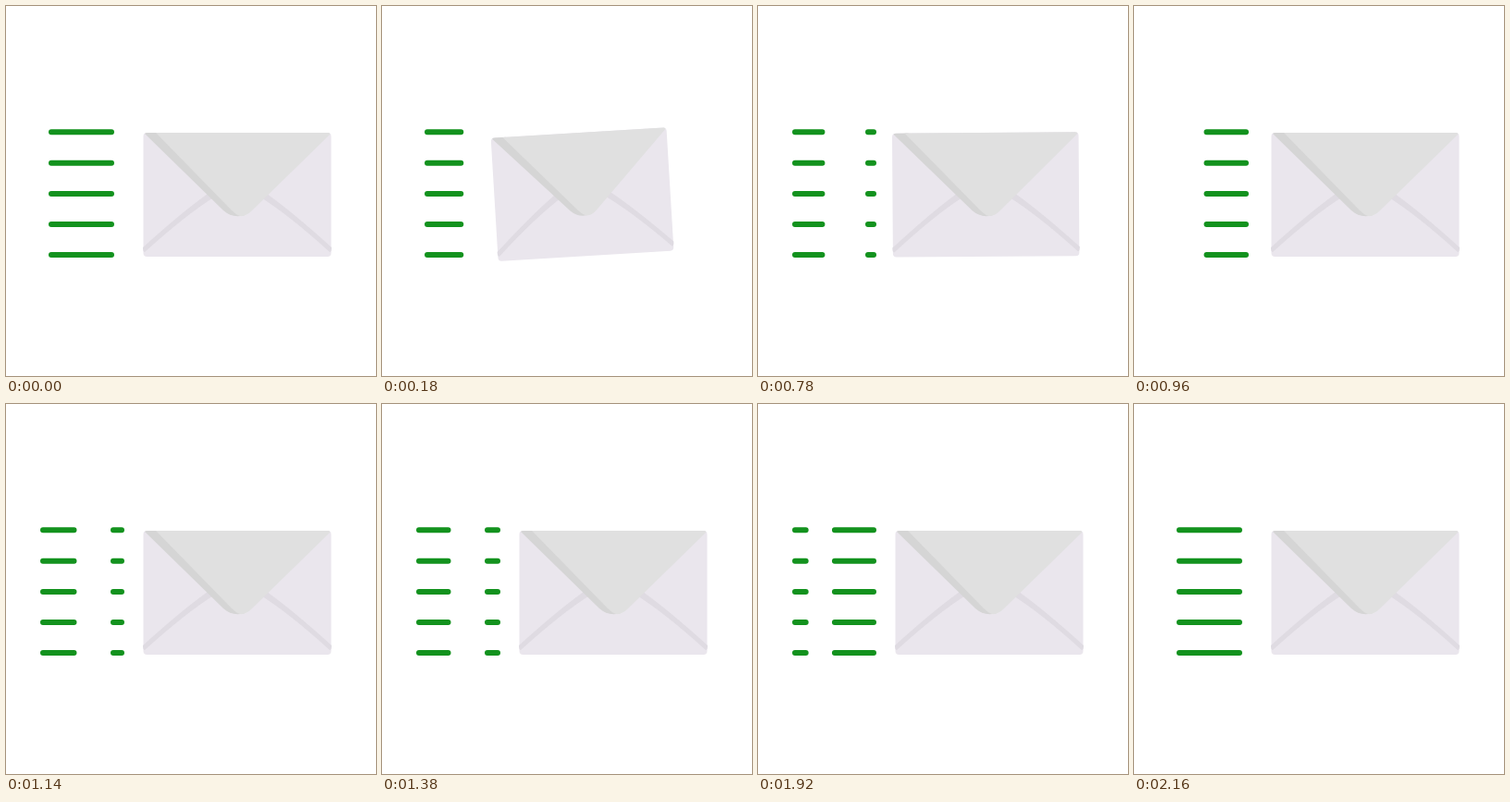
Write an HTML page that moves like this. It is 400x400 px and loops after 4190 ms.

```html
<!DOCTYPE html>
<html lang="en">
<head>
<meta charset="utf-8">
<title>Sending mail</title>
<style>
  html, body { margin: 0; width: 100%; height: 100%; overflow: hidden; background: #fff; }
  svg { display: block; width: 100%; height: 100%; }
</style>
</head>
<body>
<svg viewBox="0 0 400 400">
  <path id="lines" fill="none" stroke="#13921e" stroke-width="6" stroke-linecap="round"/>
  <g id="envelope">
    <rect x="-101.5" y="-67" width="203" height="134" rx="4" fill="#eae6ed"/>
    <g fill="#dfdbe2">
      <path id="crease" d="M-102 57Q-60 19-32-1L-24 2Q-56 22-100 62Q-102 62-102 57Z"/>
      <use href="#crease" transform="scale(-1 1)"/>
    </g>
    <path fill="#d5d5d5" d="M-100-66Q-99-67-97-67H-84L4 20L8 22Q-5 26-15 17Z"/>
    <path fill="#e0e0e0" d="M-88-67H98Q101-67 100-65L16 17Q9 24 3 23Q-1 22-7 16Z"/>
  </g>
</svg>
<script>
const LOOP = 4190, STEP = 30, LAST = 2160;
const TRACK = { from: 40, to: 125 };
const PERIOD = TRACK.to - TRACK.from;
const ROWS = [136.2, 169.8, 202.9, 236, 269];
// time, unwrapped left end of the dash
const TRAVEL = [[540, 159], [780, 119], [1140, 31], [1380, -56], [1680, -187], [2160, -291]];

const lines = document.getElementById('lines');
const envelope = document.getElementById('envelope');

const ease = (t, from, to) => {
  const x = Math.min(1, Math.max(0, (t - from) / (to - from)));
  return x * x * (3 - 2 * x);
};

function slope(i) {
  if (i === TRAVEL.length - 1) return 0;
  const [a, b] = [TRAVEL[Math.max(0, i - 1)], TRAVEL[i + 1]];
  return (b[1] - a[1]) / (b[0] - a[0]);
}

function travel(t) {
  let i = 0;
  while (i < TRAVEL.length - 2 && t >= TRAVEL[i + 1][0]) i++;
  const [[t0, p0], [t1, p1]] = [TRAVEL[i], TRAVEL[i + 1]];
  const d = t1 - t0, x = (t - t0) / d, y = 1 - x;
  return p0 * (1 + 2 * x) * y * y + p1 * x * x * (3 - 2 * x)
    + d * x * y * (slope(i) * y - slope(i + 1) * x);
}

function dash(t) {
  if (t < 540) return [49, 65 * (1 - ease(t, 0, 390))];
  return [travel(t), 42.5 * ease(t, 540, 864) + 22.5 * ease(t, 1680, LAST)];
}

// A dash leaving one end of the track comes back at the other.
function linePath(start, length) {
  if (length < 0.5) return '';
  const left = TRACK.from + ((start - TRACK.from) % PERIOD + PERIOD) % PERIOD;
  let d = '';
  for (const x of [left, left - PERIOD]) {
    const a = Math.max(x, TRACK.from), b = Math.min(x + length, TRACK.to);
    if (b > a) for (const y of ROWS) d += `M${a} ${y}H${b}`;
  }
  return d;
}

function draw(t) {
  const pull = ease(t, 0, 450) - ease(t, 450, 825);
  envelope.setAttribute('transform',
    `translate(${250 - 95 * pull} ${204 - pull}) rotate(${-9.8 * pull}) ` +
    `scale(${1 - 0.18 * pull} ${1 - 0.01 * pull})`);
  lines.setAttribute('d', linePath(...dash(t)));
}

const began = performance.now();
function tick() {
  const t = (performance.now() - began) % LOOP;
  draw(Math.min(LAST, Math.floor(t / STEP) * STEP));
  requestAnimationFrame(tick);
}
tick();
</script>
</body>
</html>
```
